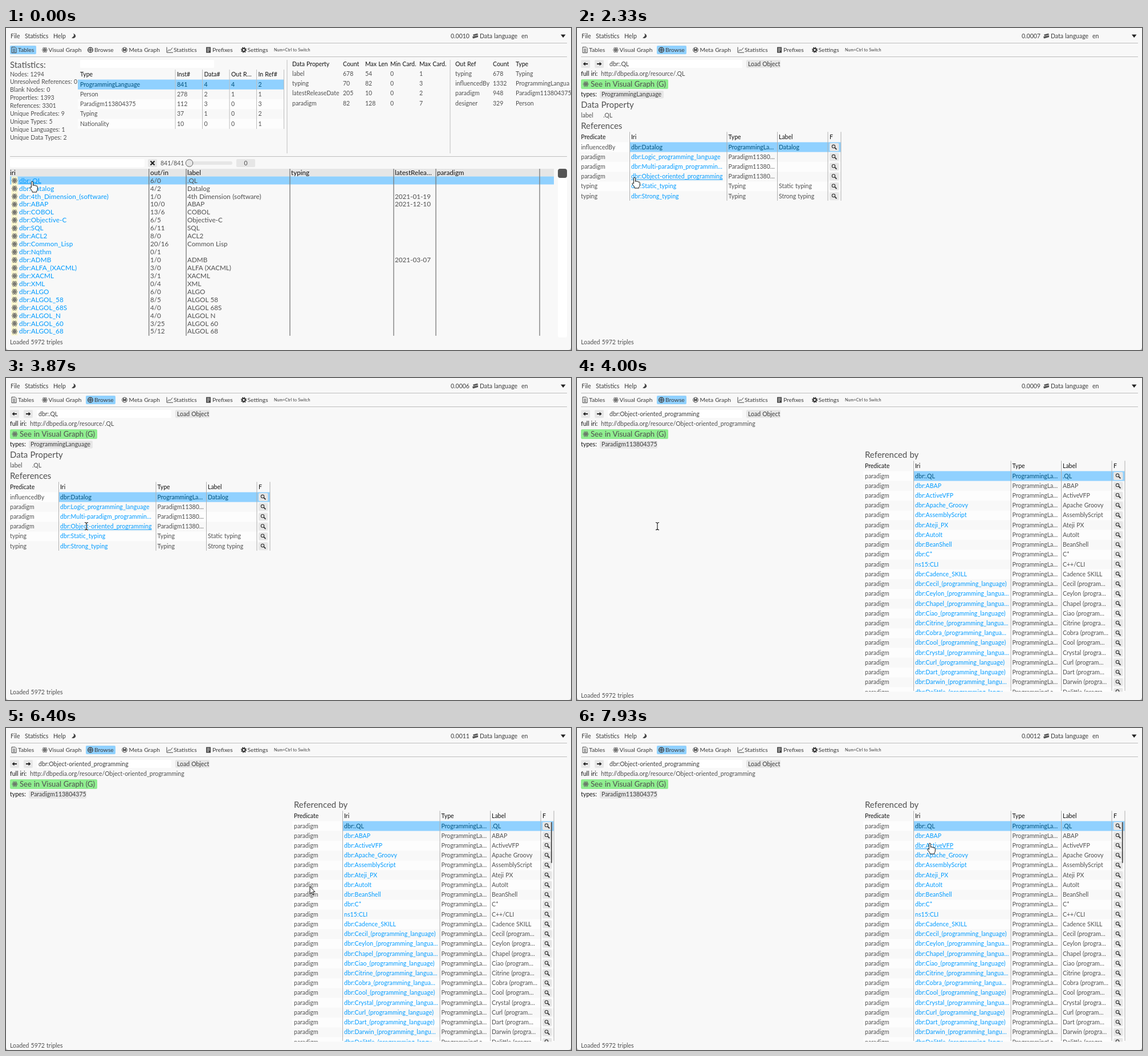
Write an HTML page that moves like this. It is 991 px wide and 565 px high and loops after 8 s.

```html
<!DOCTYPE html>
<html lang="en">
<head>
<meta charset="utf-8">
<title>Graph data browser</title>
<style>
  html, body { margin: 0; width: 100%; height: 100%; overflow: hidden; background: #b4b4b4; }
  svg { display: block; width: 100%; height: 100%; font: 10.5px Lato, "Open Sans", sans-serif; word-spacing: .04em; }
  text { fill: #505050; white-space: pre; }
  .strong { fill: #111; }
  .menu { fill: #3c3c3c; }
  .link { fill: #009bff; }
  .sel { fill: #00537d; }
  .url { letter-spacing: .009em; }
  .ink { fill: none; stroke: #444; stroke-width: 1; }
</style>
</head>
<body>
<svg id="stage" viewBox="0 0 991 565">
  <defs>
    <g id="atom" fill="none" stroke="#666" stroke-width=".9">
      <ellipse rx="4.8" ry="2"/><ellipse rx="4.8" ry="2" transform="rotate(60)"/>
      <ellipse rx="4.8" ry="2" transform="rotate(120)"/><circle r="1.1" fill="#666"/>
    </g>
    <g id="sheet" class="ink"><path d="M-4-5H2L4-3V5H-4ZM-2-1.5H2M-2 .7H2M-2 2.9H2"/></g>
    <g id="globe" class="ink"><circle r="4.3" stroke-width="1.5"/><circle r="1.8"/><path d="M-4 0H4M0-4V4" stroke-width=".7"/></g>
    <g id="meta" class="ink"><circle r="4.4"/><path d="M-2 2.5V-2L0 1 2-2V2.5" stroke-width="1.5"/></g>
    <g id="chart" class="ink"><path d="M-5-5V4.5H6M-3.5 2.5L-1-.5 1 1 5-4"/></g>
    <g id="card"><rect x="-4" y="-5" width="8" height="10" fill="#444"/><path d="M-2.5-2.5H2.5M-2.5 0H2.5M-2.5 2.5H1" stroke="#f8f8f8"/></g>
    <g id="gear" fill="none" stroke="#333"><circle r="2.7" stroke-width="2"/><circle r="4.3" stroke-width="1.6" stroke-dasharray="1.7 1.677"/></g>
    <g id="lens" fill="none" stroke="#333"><circle cx="-1.2" cy="-1.2" r="2.7" stroke-width="1.1"/><path d="M1 1L4.2 4.2" stroke-width="1.8"/></g>
    <path id="arrow" d="M0 0V13L3 10.3 5 15 7 14.2 5 9.6H9Z" fill="#fff" stroke="#111"/>
    <path id="hand" d="M-1.6 10V.8q0-1.6 1.5-1.6T1.4 .8V6.5q0-1 1.3-1T4.2 7q.2-1 1.4-.9T7 7.8q.2-.8 1.2-.7T9.3 8.6V12q0 3-1.6 4.2V18H0v-1.6Q-1.5 14-4 11q-.6-1.3 .4-1.8T-1.6 10Z" fill="#fff" stroke="#111"/>
    <path id="stem" d="M-3-6.500Q0-6.500 0-4.500V4.500Q0 6.500-3 6.500M3-6.500Q0-6.500 0-4.500M3 6.500Q0 6.500 0 4.500" fill="none"/>
    <g id="beam"><use href="#stem" stroke="#fff" stroke-width="2.4"/><use href="#stem" stroke="#111" stroke-width="1.1"/></g>
    <path id="resize" d="M-8 0L-4-4V-1.2H4V-4L8 0 4 4V1.2H-4V4Z" fill="#111" stroke="#fff" stroke-width=".8"/>
    <clipPath id="refClip"><rect x="498" y="120" width="470" height="430.5"/></clipPath>
  </defs>
</svg>
<script>
const stage = document.getElementById('stage');
const BLUE = '#90d1ff', GREY = '#e6e6e6', RULE = '#bebebe', FAINT = '#fdfdfd';
const BODY = 10.5, MAIN = 11.7, HEAD = 14.95;
const links = { tables: [], object: [], paradigm: [] };

// y is the vertical middle of the text
const text = (x, y, s, cls = '', size = BODY) =>
  `<text x="${x}" y="${(y + size * .335).toFixed(2)}" class="${cls}" font-size="${size}">${s}</text>`;
const rect = (x, y, w, h, fill, r = 0) =>
  `<rect x="${x}" y="${y}" width="${w}" height="${h}" rx="${r}" fill="${fill}"/>`;
const line = (d, color = RULE, w = 1) => `<path d="${d}" stroke="${color}" stroke-width="${w}" fill="none"/>`;
const group = (id, s) => `<g id="${id}">${s}</g>`;
const icon = (id, x, y) => `<use href="#${id}" x="${x}" y="${y}"/>`;
const cells = (xs, y, row, cls, size) => row.map((s, i) => text(xs[i], y, s, cls, size)).join('');
const columns = (xs, y0, y1, color, w) => line(xs.map(x => `M${x} ${y0}V${y1}`).join(''), color, w);

function link(scene, x, y, s, size = BODY, cls = 'link') {
  links[scene].push({ x, y, half: size === MAIN ? 7 : 8.6 });
  return text(x, y, s, cls + ' url', size);
}

function topBar() {
  const tabs = [['sheet', 14, 21, 'Tables'], ['atom', 68, 74.5, 'Visual Graph'], ['globe', 148, 155, 'Browse'],
    ['meta', 208, 215.5, 'Meta Graph'], ['chart', 287, 294, 'Statistics'], ['card', 355, 362, 'Prefixes'],
    ['gear', 417, 423.5, 'Settings']];
  return cells([8, 33, 83], 14, ['File', 'Statistics', 'Help'], 'menu') +
    '<path d="M117.500 9.500Q122 13 115 17.500Q121 19 122.300 14.500Q122 10.500 117.500 9.500Z" fill="#444"/>' +
    '<path d="M819 11.500L827 9.500 828 12 820 14ZM818 15L828 13V16L819 18.500Z" fill="#555"/>' +
    text(831, 14, 'Data language', 'menu') + text(904, 14, 'en', 'menu') +
    '<path d="M973 11.500H981.500L977.200 17Z" fill="#222"/>' +
    line('M7 26.500H984M7 50.500H984') +
    group('tabTables', rect(7, 31, 46, 15, BLUE, 2)) + group('tabBrowse', rect(140, 31, 52, 15, BLUE, 2)) +
    tabs.map(([id, ix, x, s]) => icon(id, ix, 38.5) + text(x, 38.5, s, 'menu', 10.3)).join('') +
    text(470, 38.5, 'Num+Ctrl to Switch', 'menu', 7.2);
}

function tablesScene() {
  const facts = ['Nodes: 1294', 'Unresolved References: 0', 'Blank Nodes: 0', 'Properties: 1393', 'References: 3301',
    'Unique Predicates: 9', 'Unique Types: 5', 'Unique Languages: 1', 'Unique Data Types: 2'];
  let s = text(7, 65, 'Statistics:', '', HEAD) + facts.map((f, i) => text(7, 81 + i * 13.95, f)).join('');

  const typeX = [130, 300, 347.5, 395, 442.5];
  s += rect(130, 56, 235, 14, '#fff', 2) + cells(typeX, 81, ['Type', 'Inst#', 'Data#', 'Out R…', 'In Ref#'], 'strong') +
    rect(126, 90.5, 361, 17.3, BLUE) + rect(126, 125, 361, 17.2, FAINT) + rect(126, 159.5, 361, 17.2, FAINT);
  ['ProgrammingLanguage 841 4 4 2', 'Person 278 2 1 1', 'Paradigm113804375 112 3 0 3', 'Typing 37 1 0 2', 'Nationality 10 0 0 1']
    .forEach((r, i) => s += cells(typeX, 99.2 + i * 17.23, r.split(' '), i ? '' : 'sel'));
  s += columns([297, 344.5, 392, 439.5, 487.5], 73, 177);

  const propX = [502, 591, 630, 674, 725], refX = [788, 854, 894];
  s += columns([493, 779], 56, 220) +
    cells(propX, 63, ['Data Property', 'Count', 'Max Len', 'Min Card.', 'Max Card.'], 'strong') +
    cells(refX, 63, ['Out Ref', 'Count', 'Type'], 'strong');
  ['label 678 54 0 1', 'typing 70 82 0 3', 'latestReleaseDate 205 10 0 2', 'paradigm 82 128 0 7']
    .forEach((r, i) => s += cells(propX, 80.3 + i * 17.23, r.split(' ')));
  ['typing 678 Typing', 'influencedBy 1332 ProgrammingLangua', 'paradigm 948 Paradigm113804375', 'designer 329 Person']
    .forEach((r, i) => s += cells(refX, 80.3 + i * 17.23, r.split(' ')));

  s += line('M7 225.500H984') + rect(7, 230, 236, 14, '#fff', 2) + rect(249, 230, 16, 14, GREY, 2) +
    line('M253.500 233.500L260.500 240.500M260.500 233.500L253.500 240.500', '#222', 2.2) + text(271, 237, '841/841') +
    rect(315, 234, 82, 6, GREY, 3) + '<circle cx="321.500" cy="237" r="6.300" fill="#e6e6e6" stroke="#666"/>' +
    rect(404, 230, 33, 14, GREY, 2) + text(417.5, 237, '0');

  const mainX = [7, 253, 318, 500, 682, 756];
  s += rect(7, 247, 954, 13.5, GREY) +
    cells(mainX, 254, ['iri', 'out/in', 'label', 'typing', 'latestRelea…', 'paradigm'], 'strong', MAIN) +
    rect(7, 260.5, 954, 14, BLUE) + rect(9.5, 260.5, 11, 279, '#fbf7cf');
  const dates = { '4th_Dimension_(software)': '2021-01-19', ABAP: '2021-12-10', ADMB: '2021-03-07' };
  ('.QL 6/0 Datalog 4/2 4th_Dimension_(software) 1/0 ABAP 10/0 COBOL 13/6 Objective-C 6/5 SQL 6/11 ACL2 8/0 ' +
   'Common_Lisp 20/16 Nqthm 0/1 ADMB 1/0 ALFA_(XACML) 3/0 XACML 3/1 XML 0/4 ALGO 6/0 ALGOL_58 8/5 ALGOL_68S 4/0 ' +
   'ALGOL_N 4/0 ALGOL_60 3/25 ALGOL_68 5/12').match(/\S+ \S+/g).forEach((r, i) => {
    const [name, refs] = r.split(' '), y = 267.7 + i * 13.94;
    s += icon('atom', 15, y) + link('tables', 23, y, 'dbr:' + name, MAIN) + text(253, y, refs, '', MAIN) +
      text(318, y, name === 'Nqthm' ? '' : name.replace(/_/g, ' '), '', MAIN) + text(682, y, dates[name] || '', '', MAIN);
  });
  return s + columns([250.7, 316, 498, 680, 754, 936], 247, 540, '#777', 1.3) +
    rect(968, 247, 16, 296, '#fff', 3) + rect(968, 247, 16, 16, '#555', 4) + text(7, 551, 'Loaded 5972 triples');
}

function objectHead(name, type, chipWidth) {
  return rect(7, 56, 16, 14, GREY, 2) + rect(31, 56, 16, 14, GREY, 2) +
    '<path d="M10.500 63L14.500 59.700V62H19V64H14.500V66.300ZM43.500 63L39.500 59.700V62H35V64H39.500V66.300Z" fill="#222"/>' +
    rect(54, 56, 236, 14, '#fff', 2) + text(57, 63, 'dbr:' + name, 'menu') +
    rect(297, 56, 60, 14, GREY, 2) + text(300, 63, 'Load Object', 'menu') +
    text(7, 80, 'full iri:', 'strong') + text(42, 80, 'http://dbpedia.org/resource/' + name) +
    rect(7, 90, 153, 17, '#90ee90', 2) + icon('atom', 15.5, 98.5) + text(24, 98.5, 'See in Visual Graph (G)', '', 13.1) +
    text(7, 116.5, 'types:', 'strong') + rect(40, 110, chipWidth, 13.5, GREY, 2) + text(43, 116.5, type, 'menu');
}

// rows: [predicate, iri, type, label]
function refTable(scene, ox, top, bottom, rows) {
  const xs = [7, 95, 265.5, 354, 443].map(x => x + ox), pitch = 17.23;
  let s = cells(xs, top + 8.7, ['Predicate', 'Iri', 'Type', 'Label', 'F'], 'strong');
  rows.forEach(([pred, iri, type, label], i) => {
    const y = top + 26.7 + i * pitch, cls = i ? '' : 'sel';
    if (i % 2 === 0) s += rect(ox + 4, y - 8.6, 459, pitch, FAINT);
    if (!i) s += rect(ox + 92.5, y - 8.6, 370.5, pitch, BLUE);
    s += text(xs[0], y, pred) + link(scene, xs[1], y, iri, BODY, cls || 'link') + text(xs[2], y, type, cls) +
      text(xs[3], y, label, cls) + rect(xs[4], y - 7, 16.5, 14, GREY, 2) + icon('lens', xs[4] + 8.2, y);
  });
  return s + columns([92.5, 263, 351.5, 440, 463].map(x => x + ox), top, bottom, '#b0b0b0');
}

function objectScene() {
  const paradigm = 'Paradigm11380…';
  return objectHead('.QL', 'ProgrammingLanguage', 112) + text(7, 135, 'Data Property', '', HEAD) +
    text(7, 153, 'label') + text(46, 153, '.QL') + text(7, 172, 'References', '', HEAD) +
    refTable('object', 0, 182.3, 303, [
      ['influencedBy', 'dbr:Datalog', 'ProgrammingLa…', 'Datalog'],
      ['paradigm', 'dbr:Logic_programming_language', paradigm, ''],
      ['paradigm', 'dbr:Multi-paradigm_programmin…', paradigm, ''],
      ['paradigm', 'dbr:Object-oriented_programming', paradigm, ''],
      ['typing', 'dbr:Static_typing', 'Typing', 'Static typing'],
      ['typing', 'dbr:Strong_typing', 'Typing', 'Strong typing']]) +
    text(7, 551, 'Loaded 5972 triples');
}

function paradigmScene() {
  const row = (iri, label) => ['paradigm', iri, 'ProgrammingLa…', label];
  const rows = '.QL ABAP ActiveVFP Apache_Groovy AssemblyScript Ateji_PX AutoIt BeanShell C* CLI Cadence_SKILL'.split(' ')
    .map(n => n === 'CLI' ? row('ns15:CLI', 'C++/CLI') : row('dbr:' + n, n.replace('_', ' ')));
  // the digit is how many trailing characters the narrow column hides
  for (const item of 'Cecil0 Ceylon3 Chapel3 Ciao0 Citrine3 Cobra3 Cool0 Crystal3 Curl0 Dart0 Darwin4 Dolittle4'.split(' ')) {
    const name = item.slice(0, -1), cut = +item.slice(-1), iri = `dbr:${name}_(programming_language)`;
    rows.push(row(cut ? iri.slice(0, -cut) + '…' : iri, `${name} (${name.length > 5 ? 'progra' : 'program'}…`));
  }
  return objectHead('Object-oriented_programming', 'Paradigm113804375', 101) +
    text(505, 135, 'Referenced by', '', HEAD) +
    `<g clip-path="url(#refClip)">${refTable('paradigm', 498, 145.3, 549, rows)}</g>` +
    group('grip', line('M590.500 146V549', '#666', 1.5)) +
    group('scroll', rect(955.8, 165, 2, 72, '#555', 1)) + text(7, 557, 'Loaded 5972 triples');
}

const scenes = { tables: tablesScene(), object: objectScene(), paradigm: paradigmScene() };
stage.insertAdjacentHTML('beforeend',
  '<path d="M0 0H991V560Q991 565 986 565H5Q0 565 0 560Z" fill="#f8f8f8"/>' + topBar() +
  group('cost', text(780, 14, '0.0010', 'menu')) +
  Object.entries(scenes).map(([id, s]) => group(id, s)).join('') +
  '<path id="under" stroke="#009bff"/><use id="cursor"/>');

const el = id => document.getElementById(id);
const show = (node, on) => node.style.display = on ? '' : 'none';
const cost = el('cost').firstChild, cursor = el('cursor'), under = el('under');
for (const id in links) {
  el(id).querySelectorAll('.url').forEach((node, i) => links[id][i].width = node.getComputedTextLength());
}

const FPS = 15, LOOP = 8000;
// [tick, x, y] of the pointer
const path = [[0, 46, 270], [15, 47.5, 270], [25, 47.5, 270], [29, 64, 284], [32, 92, 288], [35, 101, 263], [38, 101, 263],
  [45, 141, 260], [76, 141, 260], [83, 153, 224], [84, 153, 224], [85, 164, 219], [91, 380, 250], [97, 564, 284],
  [99, 590, 286], [101, 612, 293], [105, 612, 317], [107, 613, 327], [109, 613, 327], [119, 619, 203]];
// [tick, ten-thousandths of a second]
const costs = [[0, 10], [15, 11], [27, 9], [31, 8], [34, 7], [42, 6], [59, 9], [72, 10], [77, 11], [97, 12]];

function pointer(tick) {
  const i = Math.max(1, path.findIndex(p => p[0] >= tick));
  const [a, x0, y0] = path[i - 1], [b, x1, y1] = path[i];
  const k = (tick - a) / (b - a);
  return tick < 15 ? [x0, y0] : [x0 + (x1 - x0) * k, y0 + (y1 - y0) * k];
}

function render(ms) {
  const tick = Math.min(119, Math.floor((ms + 4) * FPS / 1000));
  const scene = tick < 15 ? 'tables' : tick < 59 ? 'object' : 'paradigm';
  const [x, y] = pointer(tick);
  const over = links[scene].find(l => x >= l.x && x <= l.x + l.width && Math.abs(y - l.y) <= l.half);
  const onGrip = scene === 'paradigm' && Math.abs(x - 590.5) < 4;

  for (const id in scenes) show(el(id), id === scene);
  show(el('tabTables'), scene === 'tables');
  show(el('tabBrowse'), scene !== 'tables');
  show(el('grip'), onGrip);
  show(el('scroll'), x > 502);
  show(under, over);
  if (over) under.setAttribute('d', `M${over.x} ${over.y + 5.4}h${over.width}`);

  const kind = tick >= 58 && tick < 72 ? 'beam' : onGrip ? 'resize' : over ? 'hand'
    : scene === 'object' && x < 51 ? 'beam' : 'arrow';
  cursor.setAttribute('href', '#' + kind);
  cursor.setAttribute('x', Math.round(x));
  cursor.setAttribute('y', Math.round(y));
  cost.textContent = '0.00' + String(costs.filter(c => c[0] <= tick).pop()[1]).padStart(2, '0');
}

const start = performance.now();
function loop() {
  render((performance.now() - start) % LOOP);
  requestAnimationFrame(loop);
}
loop();
</script>
</body>
</html>
```
